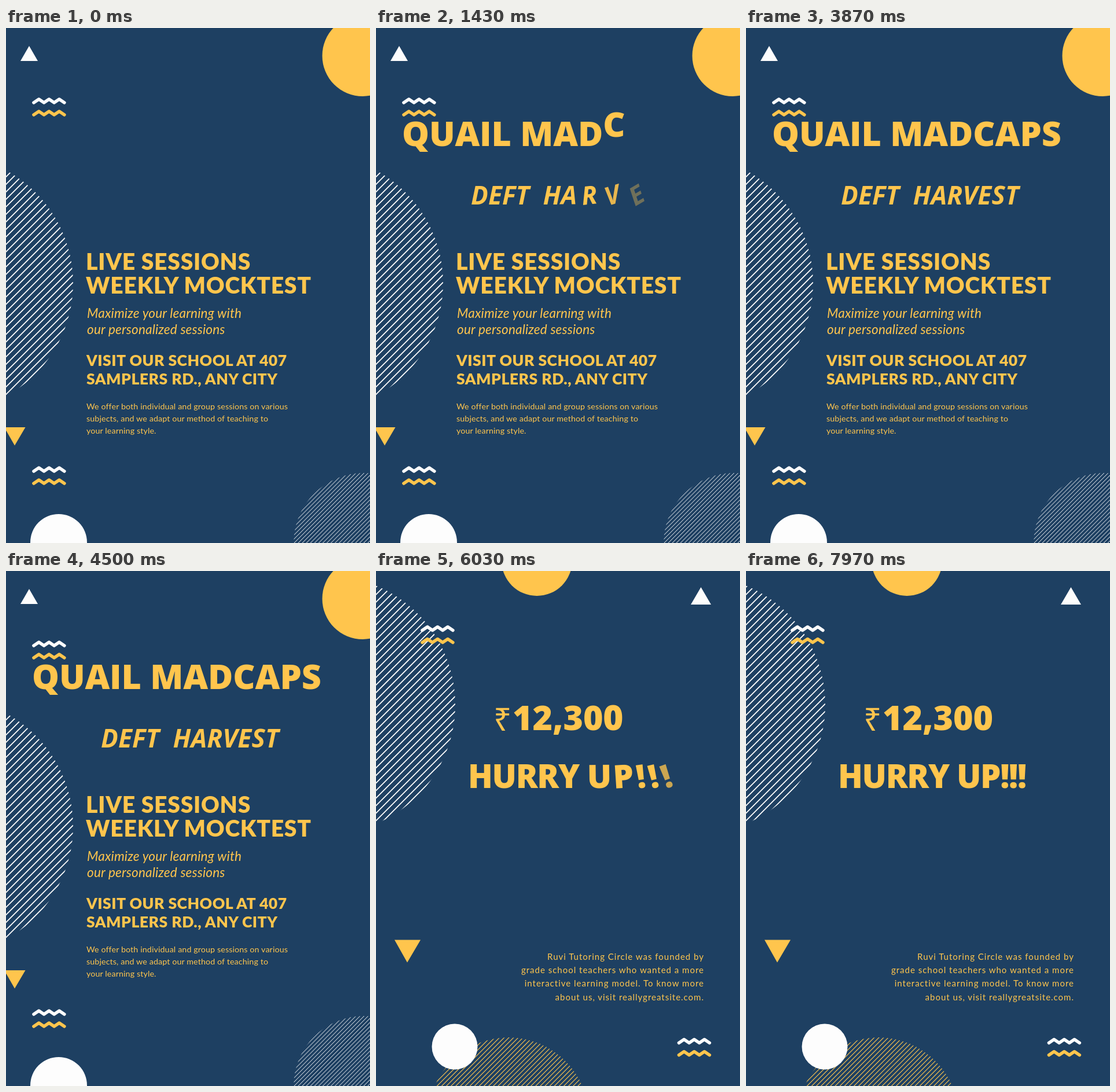
An HTML page that plays this animation: 629x890 px, repeating every 8 s.

```html
<!DOCTYPE html>
<html lang="en">
<head>
<meta charset="utf-8">
<title>Poster</title>
<style>
  html, body { margin: 0; width: 100%; height: 100%; overflow: hidden; background: #1e4062; }
  svg { display: block; width: 100%; height: 100%; }
  text { white-space: pre; fill: #ffc54d; }
  .head { font: 800 59px "Open Sans", "Noto Sans", sans-serif; }
  .sub { font: italic 700 44px "Open Sans", "Noto Sans", sans-serif; letter-spacing: .2px; }
  .hurry { font: 800 56px "Open Sans", "Noto Sans", sans-serif; letter-spacing: -1.3px; }
  .rupee { font: 400 55px "Noto Sans", "Open Sans", "DejaVu Sans", sans-serif; }
  .big { font: 900 39px Lato, sans-serif; letter-spacing: .8px; }
  .mid { font: 900 26.5px Lato, sans-serif; letter-spacing: .5px; }
  .ital { font: italic 400 22.5px Lato, sans-serif; letter-spacing: .2px; }
  .body { font: 400 14.2px Lato, sans-serif; letter-spacing: .15px; }
  .about { font: 400 15px Lato, sans-serif; letter-spacing: 1px; text-anchor: end; }
</style>
</head>
<body>
<svg id="stage" viewBox="0 0 629 890" preserveAspectRatio="none"></svg>
<script>
const NS = "http://www.w3.org/2000/svg";
const GOLD = "#ffc54d", WHITE = "#fdfdfd";
const LOOP = 8000, SWITCH = 5000;
const stage = document.getElementById("stage");

function add(parent, tag, attrs = {}, content) {
  const el = document.createElementNS(NS, tag);
  for (const k in attrs) el.setAttribute(k, attrs[k]);
  if (content) el.textContent = content;
  parent.appendChild(el);
  return el;
}

const defs = add(stage, "defs");
add(add(defs, "clipPath", { id: "drop" }), "rect", { x: 0, y: 137, width: 629, height: 90 });
add(stage, "rect", { width: 629, height: 890, fill: "#1e4062" });
const page1 = add(stage, "g"), page2 = add(stage, "g");

const disc = (g, cx, cy, r, fill) => add(g, "circle", { cx, cy, r, fill });
const tri = (g, points, fill) => add(g, "polygon", { points, fill });

let clips = 0;
// Disc filled with 45 degree lines, spaced in proportion to its radius.
function stripes(g, cx, cy, r, stroke) {
  const id = "disc" + clips++, gap = r * 0.0584;
  disc(add(defs, "clipPath", { id }), cx, cy, r);
  let d = "";
  for (let i = -24; i <= 24; i++) {
    const c = cy + i * gap;
    d += `M${cx - r} ${c + r}L${cx + r} ${c - r}`;
  }
  add(g, "path", { d, stroke, "stroke-width": r * 0.008, "clip-path": `url(#${id})` });
}

function waves(g, x, y) {
  [WHITE, GOLD].forEach((stroke, row) => {
    let d = `M${x} ${y + row * 21 + 6}`;
    for (let i = 0; i < 6; i++) d += `l8.8 ${i % 2 ? 6 : -6}`;
    add(g, "path", {
      d, stroke, fill: "none", "stroke-width": 5.6,
      "stroke-linecap": "round", "stroke-linejoin": "round"
    });
  });
}

function lines(g, cls, x, y, step, rows) {
  rows.forEach((row, i) => add(g, "text", { class: cls, x, y: y + i * step }, row));
}

// Splits a line into single letters, keeping its natural spacing.
function split(g, cls, x, y, str) {
  const probe = add(g, "text", { class: cls, x, y }, str);
  const out = [];
  let word = 0, pos = 0;
  [...str].forEach((ch, i) => {
    if (ch === " ") { word++; pos = 0; return; }
    const left = probe.getStartPositionOfChar(i).x;
    const right = probe.getEndPositionOfChar(i).x;
    const el = add(g, "text", { class: cls, x: left, y }, ch);
    out.push({ el, i, word, pos: pos++, n: out.length, cx: (left + right) / 2 });
  });
  probe.remove();
  return out;
}

// First page
stripes(page1, -106, 441, 222, WHITE);
stripes(page1, 618, 890, 121, WHITE);
disc(page1, 616.5, 48, 70, GOLD);
tri(page1, "40,31 25,57 55,57", WHITE);
tri(page1, "-3,690 33.5,690 15,721.5", GOLD);
disc(page1, 91, 889, 49, WHITE);
waves(page1, 48, 123);
waves(page1, 48, 760);
lines(page1, "big", 138, 418, 41, ["LIVE SESSIONS", "WEEKLY MOCKTEST"]);
lines(page1, "ital", 140, 501, 27.5, ["Maximize your learning with", "our personalized sessions"]);
lines(page1, "mid", 139, 584, 32, ["VISIT OUR SCHOOL AT 407", "SAMPLERS RD., ANY CITY"]);
lines(page1, "body", 139, 659, 21.2, [
  "We offer both individual and group sessions on various",
  "subjects, and we adapt our method of teaching to",
  "your learning style."
]);

// Second page
stripes(page2, -86, 231, 223, WHITE);
stripes(page2, 229, 945, 139, GOLD);
disc(page2, 278, -18, 61, GOLD);
tri(page2, "561.5,28 544,58 579,58", WHITE);
tri(page2, "32,637.5 77,637.5 54,676.5", GOLD);
disc(page2, 136, 822, 39.5, WHITE);
waves(page2, 80, 96.5);
waves(page2, 523.5, 809.5);
lines(page2, "about", 567, 672, 23.2, [
  "Ruvi Tutoring Circle was founded by",
  "grade school teachers who wanted a more",
  "interactive learning model. To know more",
  "about us, visit reallygreatsite.com."
]);

// Animated lines
const titleBox = add(page1, "g", { "clip-path": "url(#drop)" });
const title = split(titleBox, "head", 45, 204, "QUAIL MADCAPS");
const sub = split(page1, "sub", 164, 304.5, "DEFT  HARVEST");
const price = [
  ...split(page2, "rupee", 203, 276, "₹"),
  ...split(page2, "head", 236, 275, "12,300")
];
const hurry = split(page2, "hurry", 159, 375, "HURRY UP!!!");

const phase = (t, start, dur) => Math.min(1, Math.max(0, (t - start) / dur));
const show = (el, on) => el.setAttribute("visibility", on ? "inherit" : "hidden");

function drop(l, p) {
  show(l.el, p > 0);
  l.el.setAttribute("transform", `translate(0 ${-75 * (1 - p) ** 3})`);
}

function roll(l, p, cy) {
  const dx = 51 * (1 - p) ** 1.5;
  show(l.el, p > 0);
  l.el.setAttribute("opacity", Math.min(1, p * 2));
  l.el.setAttribute("transform", `translate(${dx} 0) rotate(${-0.8 * dx} ${l.cx} ${cy})`);
}

function pop(l, p, cy) {
  const q = p - 1, s = Math.max(0, 1 + 2.70158 * q ** 3 + 1.70158 * q * q);
  show(l.el, p > 0);
  l.el.setAttribute("transform", `translate(${l.cx} ${cy}) scale(${s}) translate(${-l.cx} ${-cy})`);
}

function draw(t) {
  const first = t < SWITCH;
  show(page1, first);
  show(page2, !first);
  if (first) {
    title.forEach(l => drop(l, phase(t, 330 + 502 * l.word + 160 * l.pos, 300)));
    sub.forEach(l => roll(l, phase(t, 150 + 120 * l.i, 450), 289));
  } else {
    const u = t - SWITCH;
    price.forEach((l, k) => pop(l, phase(u, 130 + 128 * k, 150), 255));
    hurry.forEach(l => roll(l, phase(u, 300 + 62 * l.n, 450), 355));
  }
}

const begin = performance.now();
function tick() {
  draw((performance.now() - begin) % LOOP);
  requestAnimationFrame(tick);
}
tick();
</script>
</body>
</html>
```
